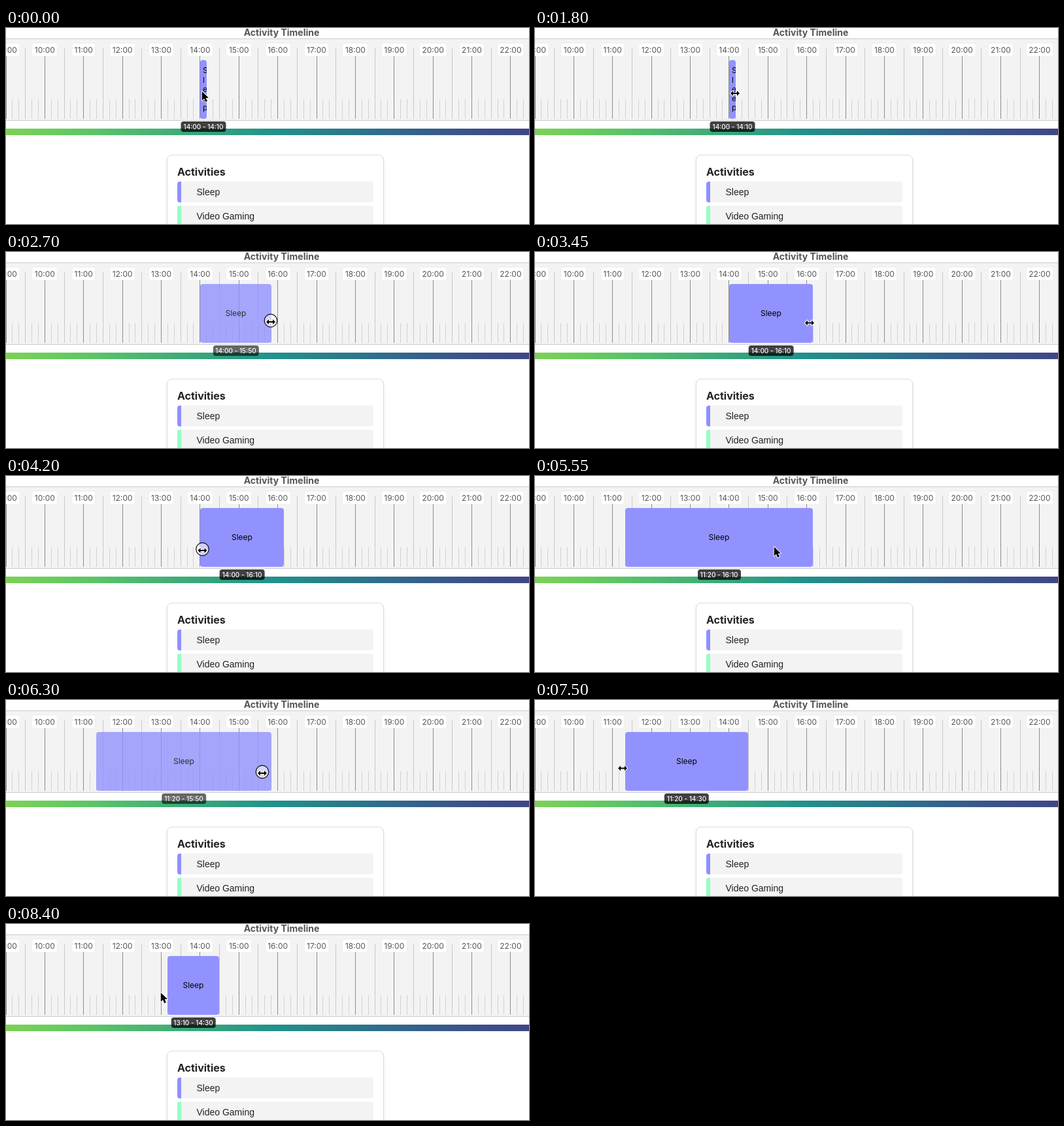
An HTML page for the animation above (8550 ms loop, 800 by 300 pixels).

```html
<!DOCTYPE html>
<html lang="en">
<head>
<meta charset="utf-8">
<title>Activity Timeline</title>
<style>
html, body { margin: 0; width: 100%; height: 100%; overflow: hidden; background: #fff; }
#stage { position: relative; width: 800px; height: 300px; overflow: hidden; font-family: Inter, sans-serif; }
#stage > *, .tick, .hour, #block, #tip { position: absolute; box-sizing: border-box; }
h1 { left: 321.5px; top: -2px; width: 200px; margin: 0; text-align: center; font-size: 14px; line-height: 18px; font-weight: 700; color: #555; }
#line { left: -2px; top: 16px; width: 804px; height: 126px; background: #f3f3f3; border: 1px solid #ccc; }
#ticks { inset: 0; }
.tick { width: 1px; bottom: 161px; height: 30px; background: #d2d2d2; }
.tick.half { height: 108px; background: #c8c8c8; }
.tick.full { height: 108px; background: #8c8c8c; }
.hour { top: 24px; height: 19px; padding: 0 3.5px; transform: translateX(-50%); background: #fff; border-radius: 3px; font-size: 12px; line-height: 19px; color: #555; box-shadow: 0 0 1px rgba(0,0,0,.12); }
#bar { left: 0; top: 154px; width: 800px; height: 10px; background: linear-gradient(90deg, #7dd155, #5ec962 110px, #21918c 410px, #3b528b 700px, #3f4788); }
#block { top: 49px; height: 90px; }
#face { height: 100%; box-sizing: border-box; padding: 0 4px; border-radius: 4px; overflow: hidden; background: #9292ff; display: flex; align-items: center; }
#face span { width: 100%; text-align: center; overflow-wrap: anywhere; font-size: 12px; line-height: 14.3px; color: #000; }
#tip { left: 50%; top: 94px; height: 16px; padding: 0 4px; transform: translateX(-50%); border-radius: 4px; background: rgba(0,0,0,.75); color: #fff; font-size: 10px; font-weight: 500; line-height: 16px; white-space: nowrap; }
#card { left: 246px; top: 194px; width: 332px; height: 140px; border: 1px solid #ddd; border-radius: 8px; background: #fff; box-shadow: 0 2px 4px rgba(0,0,0,.1); padding: 15px; }
h2 { margin: 0 0 5px; font-size: 16px; line-height: 20px; font-weight: 700; color: #222; }
.item { box-sizing: border-box; width: 300px; height: 32px; margin-bottom: 5px; padding-left: 23.5px; border-left: 6px solid; border-radius: 4px; background: #f3f3f3; font: 14px/32px "Liberation Sans", Arial, sans-serif; }
.item span { color: #222; }
svg { left: 0; top: 0; }
</style>
</head>
<body>
<div id="stage">
  <h1>Activity Timeline</h1>
  <div id="line"></div>
  <div id="ticks"></div>
  <div id="bar"></div>
  <div id="block">
    <div id="face"><span>Sleep</span></div>
    <div id="tip"></div>
  </div>
  <div id="card">
    <h2>Activities</h2>
    <div class="item" style="border-color:#9090ff"><span>Sleep</span></div>
    <div class="item" style="border-color:#95ffc3"><span>Video Gaming</span></div>
  </div>
  <svg width="800" height="300">
    <g id="cursor" stroke-linejoin="round">
      <circle id="ring" cy="-2" r="9.8" fill="#fff" fill-opacity=".55" stroke="#111" stroke-width="1.2"/>
      <path id="resize" d="M-7 0L-3-4V-1.1H3V-4L7 0L3 4V1.1H-3V4Z" stroke="#fff" stroke-width="2" paint-order="stroke"/>
      <path id="arrow" d="M.8 1V15L4 12L6.3 17.2L8.9 16.1L6.7 11H11Z" stroke="#fff" stroke-width="1.8" paint-order="stroke"/>
    </g>
  </svg>
</div>
<script>
const LOOP = 8550, STEP = 150, PX = 0.9896; // pixels per minute, left edge is 09:00
const $ = id => document.getElementById(id);

// time, x, y, look: a = arrow, r = resize, p = pressed resize
const cursorTrack = [
  [0, 299, 96, 'a'], [750, 299, 96, 'a'], [1200, 305, 97, 'a'], [1350, 305, 97, 'a'],
  [1500, 305, 99, 'r'], [1800, 306, 100, 'r'], [1950, 307, 99, 'p'], [2100, 307, 99, 'p'],
  [2250, 318, 101, 'p'], [2700, 405, 107, 'p'], [2850, 420, 109, 'p'], [3450, 420, 108.5, 'r'], [3600, 420, 108.5, 'r'],
  [3750, 395, 105, 'a'], [3900, 345, 103, 'a'], [4050, 301, 113, 'r'], [4200, 300.5, 114, 'p'], [4350, 300.5, 114, 'p'],
  [4500, 270, 113, 'p'], [4800, 145, 112, 'p'], [4950, 145, 111, 'r'],
  [5100, 185, 108, 'a'], [5400, 328, 106, 'a'], [5700, 402, 109, 'a'], [5850, 420, 117, 'r'],
  [6000, 422, 118, 'p'], [6150, 422, 118, 'p'], [6300, 392, 112, 'p'], [6450, 345, 110, 'p'], [6600, 318, 109, 'p'],
  [6750, 316, 108, 'r'], [6900, 270, 104, 'a'], [7050, 200, 102, 'a'], [7200, 142, 105, 'r'], [7500, 134, 104.5, 'r'],
  [7650, 134, 105, 'p'], [7800, 151, 106, 'p'], [8100, 229, 107, 'p'], [8250, 238, 107, 'p'], [8400, 236, 104, 'a']
];

// time, start and end in minutes after 09:00, dragging
const blockTrack = [
  [0, 300, 310, 0], [2250, 300, 320, 1], [2400, 300, 350, 1], [2550, 300, 380, 1], [2700, 300, 410, 1],
  [2850, 300, 430, 1], [3450, 300, 430, 0],
  [4500, 270, 430, 1], [4650, 200, 430, 1], [4800, 140, 430, 1], [4950, 140, 430, 0],
  [6300, 140, 410, 1], [6450, 140, 360, 1], [6600, 140, 330, 1], [6750, 140, 330, 0],
  [7800, 160, 330, 1], [7950, 200, 330, 1], [8100, 240, 330, 1], [8250, 250, 330, 1], [8400, 250, 330, 0]
];

const clock = m => Math.floor(m / 60) + 9 + ':' + String(m % 60).padStart(2, '0');
const indexAt = (track, t) => track.findLastIndex(row => row[0] <= t);

function add(cls, x, text = '') {
  const el = document.createElement('div');
  el.className = cls;
  el.style.left = x + 'px';
  el.textContent = text;
  $('ticks').append(el);
}

for (let m = 0; m <= 810; m += 10) {
  add('tick' + (m % 60 ? m % 30 ? '' : ' half' : ' full'), Math.floor(m * PX));
}
for (let m = 0; m < 840; m += 60) add('hour', m * PX, clock(m).padStart(5, '0'));

function drawCursor(t) {
  const i = indexAt(cursorTrack, t);
  const [t0, x0, y0, look] = cursorTrack[i];
  const [t1, x1, y1] = cursorTrack[i + 1] || [LOOP, x0, y0];
  const k = (t - t0) / (t1 - t0);
  $('cursor').setAttribute('transform', `translate(${x0 + (x1 - x0) * k} ${y0 + (y1 - y0) * k})`);
  const show = (id, on) => $(id).style.display = on ? '' : 'none';
  show('arrow', look === 'a');
  show('resize', look !== 'a');
  show('ring', look === 'p');
}

function drawBlock(t) {
  const [, start, end, drag] = blockTrack[indexAt(blockTrack, t)];
  const style = $('block').style;
  const left = Math.round(start * PX - 0.1);
  style.left = left + 'px';
  style.width = Math.floor(end * PX + 0.3) - left + 'px';
  style.opacity = drag ? 0.8 : 1;
  $('tip').textContent = clock(start) + ' - ' + clock(end);
}

function frame() {
  const t = Math.floor(performance.now() % LOOP / STEP) * STEP;
  drawCursor(t);
  drawBlock(t);
  requestAnimationFrame(frame);
}
frame();
</script>
</body>
</html>
```
